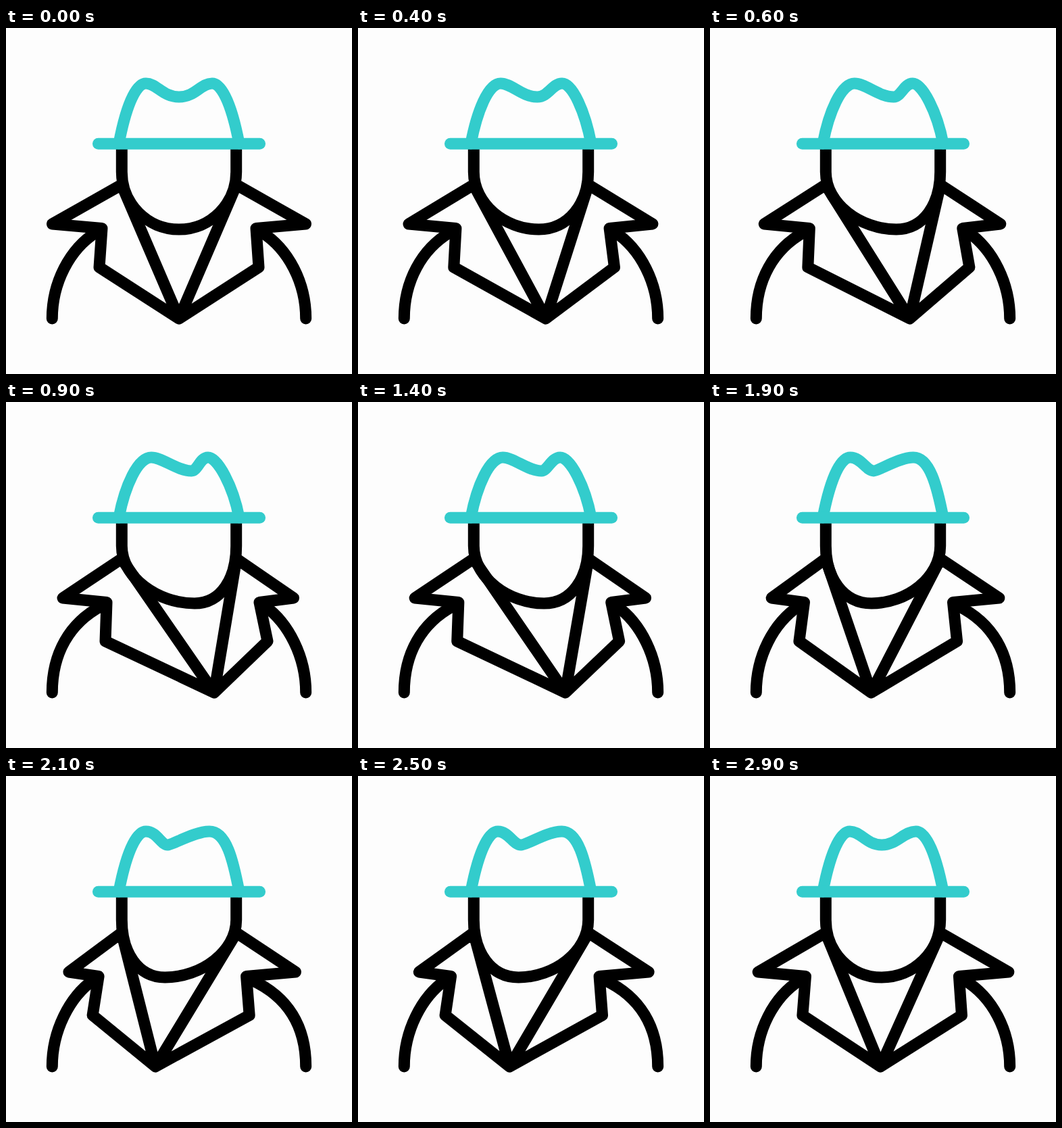
Write an HTML page that moves like this. It is 512 by 512 pixels and loops after 3 s.

```html
<!DOCTYPE html>
<html lang="en">
<head>
<meta charset="utf-8">
<title>Looking around</title>
<style>
  html, body { margin: 0; width: 100%; height: 100%; overflow: hidden; background: #fdfdfd; }
  svg { display: block; width: 100vw; height: 100vh; }
  path { fill: none; stroke: #000; stroke-width: 17; stroke-linecap: round; stroke-linejoin: round; }
  .hat path { stroke: #33cccc; }
</style>
</head>
<body>
<svg viewBox="0 0 512 512">
  <path id="arms"/>
  <path id="coat"/>
  <path id="face"/>
  <g class="hat">
    <path id="crown"/>
    <path d="M136.5 171.3H375.5"/>
  </g>
</svg>
<script>
const LOOP = 3000, STEP = 100, BODY_LAG = 90;

function ease(t, start, end) {
  const p = Math.min(1, Math.max(0, (t - start) / (end - start)));
  return (1 - Math.cos(Math.PI * p)) / 2;
}

// How far the figure is turned right and left, each from 0 to 1.
function turn(t, lag) {
  const out = ease(t, 0, 800 + lag);
  const across = ease(t, 1250 + lag, 2050 + lag);
  const back = ease(t, 2350, 3050);
  return { right: out - across, left: across - back };
}

const draw = (id, d) => document.getElementById(id).setAttribute('d', d);

function drawBody({ right, left }) {
  const at = (x, dr, dl) => x + dr * right + dl * left;
  const notchL = at(142, 7, -5), notchR = at(370, 5, -14.5);
  const hem = at(256, 52, -35.5);
  const lapelL = `L${at(68.5, 15.5, 24.5)} 290L${notchL} 296.5L${at(138, 9, -10)} 354`;
  const lapelR = `L${at(374, 13, -14)} 354L${notchR} 296.5L${at(443.5, -18, -15)} 290`;

  draw('coat', `M171 232${lapelL}L${hem} 430${lapelR}L341 232L${hem} 430Z`);
  draw('arms',
    `M68.3 430C68.3 ${377 - 5 * right} 94 327 ${notchL - 8} 302` +
    `M443.7 430C443.7 ${377 - 6 * left} 418 327 ${notchR + 8} 302`);
}

function drawHead({ right, left }) {
  const yaw = right - 0.9 * left;
  const chin = 256 + 23 * yaw, chinIn = 209 + 16 * yaw, chinOut = 303 + 16 * yaw;
  draw('face',
    `M171.3 172V213C171.3 260 ${chinIn} 298 ${chin} 298` +
    `C${chinOut} 298 340.7 260 340.7 213V172`);

  // The dip slides sideways and sharpens towards the side it faces.
  const dip = 256 + 18.5 * yaw;
  const dipIn = dip - 24 + 3 * right + 14 * left;
  const dipOut = dip + 24 - 15 * right - 17 * left;
  const peakL = 207 + 8 * right, peakR = 305 - 6 * right - 4 * left;
  draw('crown',
    `M167 171C176 124 ${peakL - 17 - 3 * right} 82 ${peakL} 82` +
    `C${peakL + 16} 82 ${dipIn} 102 ${dip} 102` +
    `C${dipOut} 102 ${peakR - 17 + 5 * right - 5 * left} 82 ${peakR} 82` +
    `C${peakR + 17 - 3 * right + 8 * left} 82 336 124 345 171`);
}

const origin = performance.now();
function tick() {
  const elapsed = (performance.now() - origin) % LOOP;
  const t = Math.floor(elapsed / STEP) * STEP;
  drawBody(turn(t, BODY_LAG));
  drawHead(turn(t, 0));
  requestAnimationFrame(tick);
}
tick();
</script>
</body>
</html>
```
